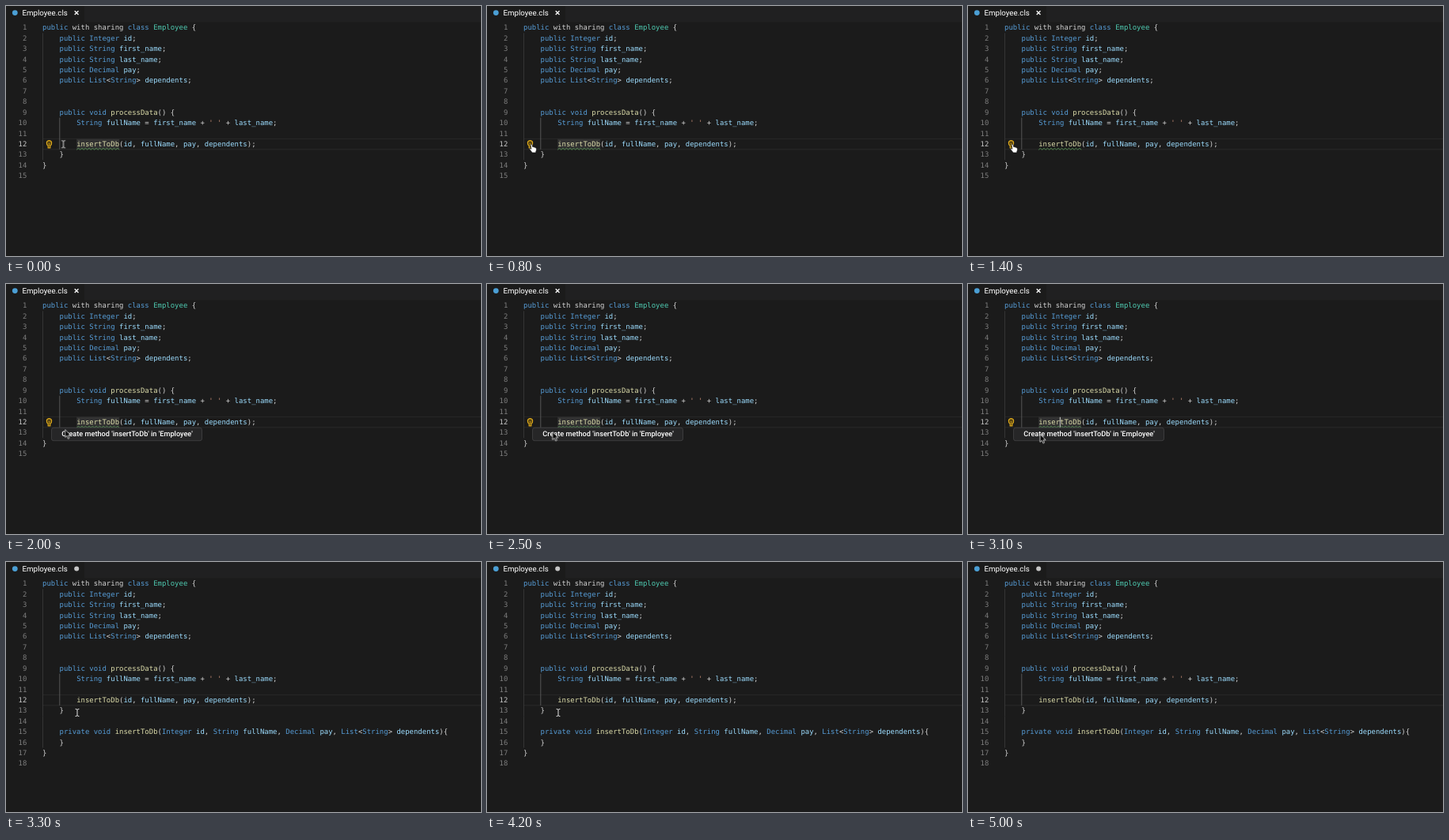
Write an HTML page that moves like this. It is 600 by 317 pixels and loops after 5.1 s.

```html
<!DOCTYPE html>
<html lang="en">
<head>
<meta charset="utf-8">
<title>Create method quick fix</title>
<style>
html, body { margin: 0; width: 100%; height: 100%; overflow: hidden; background: #1b1b1b; }
svg { display: block; }
text { white-space: pre; text-rendering: geometricPrecision; }
.code { font: 8.96px "DejaVu Sans Mono", monospace; fill: #d4d4d4; }
.ui { font-family: Roboto, sans-serif; fill: #fff; }
.num { fill: #7d7d7d; text-anchor: end; }
.now { fill: #c6c6c6; }
.kw { fill: #569cd6; }
.fn { fill: #dcdcaa; }
.type { fill: #4ec9b0; }
.str { fill: #ce9178; }
.var { fill: #9cdcfe; }

.before, .after, .word, .menu, .caret, .beam, .hand, .arrow { animation: 5.1s step-end infinite; }
.before { animation-name: before; }
.after { animation-name: after; }
.word { animation-name: word; }
.menu { animation-name: menu; }
.caret { animation-name: caret; }
.beam { animation-name: beam; }
.hand { animation-name: hand; }
.arrow { animation-name: arrow; }
.pointer { animation: move 5.1s step-end infinite; }

@keyframes before { 0% { opacity: 1 } 62.745%, 100% { opacity: 0 } }
@keyframes after { 0% { opacity: 0 } 62.745%, 100% { opacity: 1 } }
@keyframes word { 0% { opacity: 1 } 25.49% { opacity: 0 } 37.255%, 100% { opacity: 1 } }
@keyframes menu { 0% { opacity: 0 } 31.373%, 100% { opacity: 1 } }
@keyframes caret { 0% { opacity: 0 } 52.941% { opacity: 1 } 62.745%, 100% { opacity: 0 } }
@keyframes beam { 0% { opacity: 1 } 7.843% { opacity: 0 } 62.745% { opacity: 1 } 86.275%, 100% { opacity: 0 } }
@keyframes hand { 0% { opacity: 0 } 7.843% { opacity: 1 } 33.333%, 100% { opacity: 0 } }
@keyframes arrow { 0% { opacity: 0 } 33.333% { opacity: 1 } 62.745%, 100% { opacity: 0 } }
@keyframes move {
  0% { transform: translate(72.5px, 175.3px) }
  1.961% { transform: translate(72.5px, 175.3px); animation-timing-function: steps(4) }
  9.804% { transform: translate(56px, 175px) }
  33.333% { transform: translate(56px, 175px); animation-timing-function: steps(3) }
  39.216% { transform: translate(74.5px, 184.5px) }
  45.098% { transform: translate(74.5px, 184.5px); animation-timing-function: steps(4) }
  52.941% { transform: translate(91px, 190.5px) }
  62.745%, 100% { transform: translate(90px, 191px) }
}
</style>
</head>
<body>
<svg width="600" height="317" viewBox="0 0 600 317">
  <rect width="600" height="317" fill="#1b1b1b"/>
  <rect x="99" width="501" height="20.5" fill="#202021"/>
  <circle cx="11.3" cy="8.6" r="3.4" fill="#4b9fd5"/>
  <text class="ui" x="20.4" y="12" font-size="9.75">Employee.cls</text>
  <path class="before" d="M86.7 6.2l4.8 4.8m0-4.8l-4.8 4.8" stroke="#fff" stroke-width="1.3"/>
  <circle class="after" cx="89.2" cy="8.6" r="3" fill="#c5c5c5"/>

  <path d="M46 168.4H600M46 181.8H600" stroke="#282828"/>
  <path d="M46.5 34.3V195.3" stroke="#3c3c3c" stroke-width=".8"/>
  <path class="after" d="M46.5 195.3V235.6" stroke="#3c3c3c" stroke-width=".8"/>
  <path d="M67.8 141.6V181.8" stroke="#666" stroke-width=".8"/>

  <g class="before">
    <rect class="word" x="89.2" y="168.6" width="54" height="13.2" fill="#323232"/>
    <path id="squiggle" fill="none" stroke="#5b9a58" stroke-width=".9"/>
  </g>

  <g id="common" class="code"></g>
  <g id="old" class="code before"></g>
  <g id="new" class="code after"></g>

  <rect class="caret" x="115.8" y="168.8" width="1.2" height="12.8" fill="#b5b5b0"/>

  <g class="before">
    <path d="M53.2 177.2C50.5 175.4 50.6 170.9 54.5 170.7C58.4 170.9 58.5 175.4 55.8 177.2V179.8H53.2Z" fill="#4a3a10" stroke="#e0ac1c" stroke-width="1.2"/>
    <path d="M53 173.6L54.5 174.8L56 173.6M54.5 174.8V177.5" fill="none" stroke="#e0ac1c" stroke-width=".7"/>
    <g class="menu">
      <rect x="57.5" y="182.3" width="190" height="16.4" rx="2.6" fill="#262627" stroke="#454546" stroke-width=".8"/>
      <text class="ui" x="70.3" y="193" font-size="9.17" font-weight="500">Create method 'insertToDb' in 'Employee'</text>
    </g>
  </g>

  <g class="pointer">
    <path class="beam" d="M-2.4-4.6Q0-4.6 0-3.3Q0-4.6 2.4-4.6M0-3.5V3.5M-2.4 4.6Q0 4.6 0 3.3Q0 4.6 2.4 4.6" fill="none" stroke="#e2e2e2" stroke-width="1"/>
    <path class="hand" d="M-1 .6Q0-.6 1 .6L1.7 3.7Q3 3.1 3.5 4.1Q4.7 3.6 5.1 4.7Q6.6 4.6 6.6 6.2Q6.7 8.2 5.8 9.4V11H1.2L-1.8 7.2Q-2.9 5.6-1.6 5.4L-.1 6.3Z" fill="#fff" stroke="#111" stroke-width=".7"/>
    <path class="arrow" d="M0 0V10L2.3 7.9L3.9 11.4L5.6 10.6L4.1 7.2H7.2Z" fill="#080808" stroke="#eee" stroke-width=".8" stroke-linejoin="round"/>
  </g>
</svg>
<script>
const LEFT = 46, TOP = 30.35, ROW = 13.42;

const rules = [
  ['kw', /^(public|private|class|void|Integer|String|Decimal|List)$/],
  ['fn', /^(processData|insertToDb)$/],
  ['type', /^Employee$/],
  ['str', /^'/],
  ['var', /^(id|first_name|last_name|pay|dependents|fullName)$/]
];

const esc = s => s.replace(/</g, '&lt;').replace(/>/g, '&gt;');

const paint = line => line.replace(/' '|\w+|[^\w']+/g, part => {
  const rule = rules.find(([, test]) => test.test(part));
  return rule ? `<tspan class="${rule[0]}">${part}</tspan>` : esc(part);
});

const write = (id, first, lines) => {
  document.getElementById(id).innerHTML = lines.map((line, i) => {
    const n = first + i, y = TOP + ROW * (n - 1);
    return `<text class="num${n === 12 ? ' now' : ''}" x="26.4" y="${y}">${n}</text>` +
      `<text x="${LEFT}" y="${y}">${paint(line)}</text>`;
  }).join('');
};

write('common', 1, [
  'public with sharing class Employee {',
  '    public Integer id;',
  '    public String first_name;',
  '    public String last_name;',
  '    public Decimal pay;',
  '    public List<String> dependents;',
  '',
  '',
  '    public void processData() {',
  "        String fullName = first_name + ' ' + last_name;",
  '',
  '        insertToDb(id, fullName, pay, dependents);'
]);
write('old', 13, ['    }', '}', '']);
write('new', 13, [
  '    }',
  '',
  '    private void insertToDb(Integer id, String fullName, Decimal pay, List<String> dependents){',
  '    }',
  '}',
  ''
]);

document.getElementById('squiggle').setAttribute('d',
  'M89.2 182.3' + 'l2.25-2 2.25 2'.repeat(12));
</script>
</body>
</html>
```
